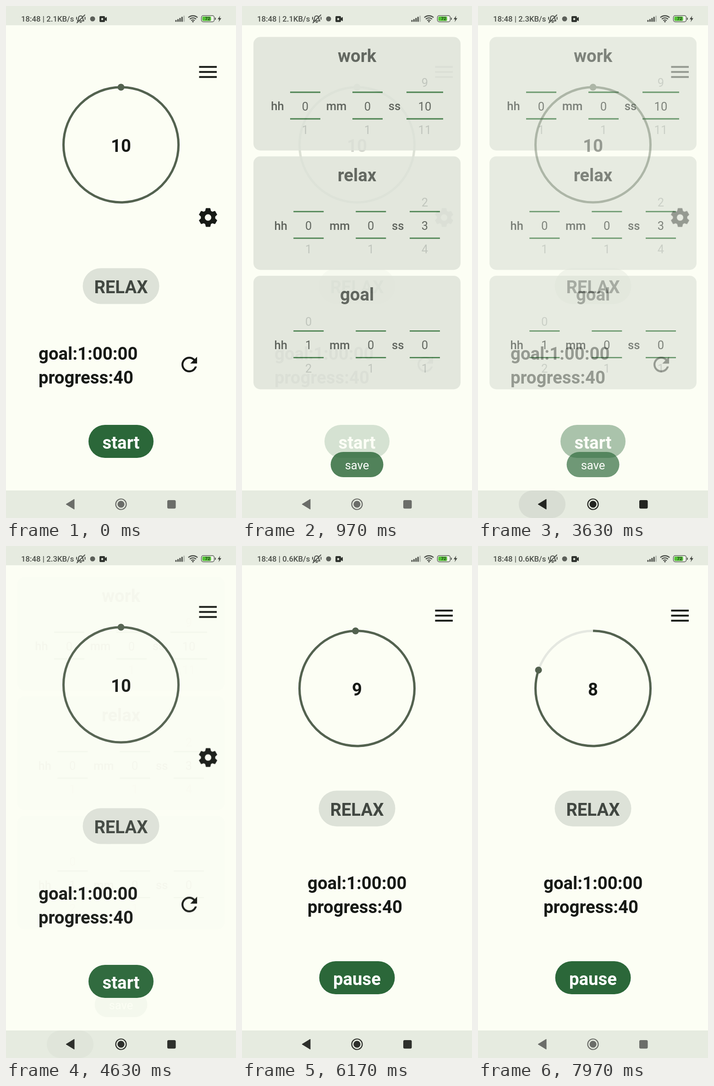
Write an HTML page that moves like this. It is 502 px wide and 1116 px high and loops after 8 s.

```html
<!DOCTYPE html>
<html lang="en">
<head>
<meta charset="utf-8">
<title>Interval timer</title>
<style>
  html, body { margin: 0; width: 100%; height: 100%; overflow: hidden; background: #fcfef4; }
  svg { display: block; width: 100vw; height: 100vh; }
  text { font-family: Roboto, "Noto Sans", sans-serif; font-size: 25.6px; }
  .big { font-size: 38.3px; font-weight: 700; }
  .mid { text-anchor: middle; }
  .ink { fill: #171a16; }
  .soft { fill: #414741; }
  .unit { font-weight: 500; fill: #3d433d; }
  .faint { fill: #b3b9b1; }
  .white { fill: #fff; }
  .green { fill: #2b6739; }
  .panel { fill: #dde2d8; }
  .bar { fill: #e6ebe0; }
  .status { font-size: 16.8px; font-weight: 500; fill: #4b4f49; }
</style>
</head>
<body>
<svg viewBox="0 0 502 1116" preserveAspectRatio="none">
  <rect width="502" height="1116" fill="#fcfef4"/>
  <g id="run"></g>
  <g id="home"></g>
  <g id="settings"></g>

  <rect class="bar" width="502" height="42"/>
  <text class="status" x="33" y="34" id="status"></text>
  <path fill="none" stroke="#4b4f49" stroke-width="2" stroke-linecap="round" stroke-linejoin="round"
    d="M156 32.500h14c-2-2-2.500-4-2.500-6.500a4.600 4.600 0 0 0-9.200 0c0 2.500-.300 4.500-2.300 6.500M161.500 35.500h3M155 36.500l17-17M154 24.500v4.500M172.500 24.500v4.500"/>
  <circle cx="189" cy="28" r="5.500" fill="#5b5f59"/>
  <path fill="#30342f" d="M206 22h8q2 0 2 2v2l4-2v9l-4-2v2q0 2-2 2h-8q-2 0-2-2v-9q0-2 2-2z"/>
  <circle cx="210" cy="28.500" r="2.200" class="bar"/>
  <g id="signal"></g>
  <path fill="none" stroke="#4b4f49" stroke-width="2.400"
    d="M398 25.200a14.500 14.500 0 0 1 20 0M401.200 28.600a9.800 9.800 0 0 1 13.600 0M404.300 31.800a5.400 5.400 0 0 1 7.400 0"/>
  <circle cx="408" cy="34" r="1.800" fill="#4b4f49"/>
  <rect x="426.500" y="21" width="28" height="13.500" rx="4" fill="#f0f4ea" stroke="#5b5f59" stroke-width="1.500"/>
  <rect x="428.500" y="23" width="19" height="9.500" rx="2" fill="#52c234"/>
  <path d="M457 25.500v4.500" stroke="#5b5f59" stroke-width="2"/>
  <text class="mid" x="440" y="31.300" style="font-size:9.500px;font-weight:700" fill="#2b3b27">72</text>
  <path fill="#3f433d" d="M467.500 21l-5.500 8h3.500l-1.500 6 6-8.500h-3.800z"/>

  <rect class="bar" y="1056" width="502" height="60"/>
  <rect id="press" x="89" y="1056" width="102" height="60" rx="30" fill="#d8ddd3"/>
  <g id="nav">
    <path d="M131 1086l18-11v22z"/>
    <circle cx="251" cy="1086" r="11.500" fill="none" stroke-width="2.200"/>
    <circle cx="251" cy="1086" r="7.600" stroke="none"/>
    <rect x="352" y="1077" width="18.500" height="18.500" rx="3" stroke="none"/>
  </g>
</svg>
<script>
const LOOP = 8000, R = 125.5;
const $ = id => document.getElementById(id);

const text = (x, y, cls, s) => `<text x="${x}" y="${y}" class="${cls}">${s}</text>`;
const box = (x, y, w, h, r, cls) =>
  `<rect x="${x}" y="${y}" width="${w}" height="${h}" rx="${r}" class="${cls}"/>`;

function gear(x, y) {
  const tooth = [[-2.75, -6.65], [-2.1, -9.4], [2.1, -9.4], [2.75, -6.65]];
  const pts = [];
  for (let i = 0; i < 6; i++) {
    const c = Math.cos(i * Math.PI / 3), s = Math.sin(i * Math.PI / 3);
    for (const [a, b] of tooth) pts.push((a * c - b * s).toFixed(2) + ' ' + (a * s + b * c).toFixed(2));
  }
  return `<path transform="translate(${x} ${y}) scale(2.13)" fill="#171a16" fill-rule="evenodd"
    stroke="#171a16" stroke-width=".4" stroke-linejoin="round"
    d="M${pts.join('L')}ZM-3.5 0a3.5 3.5 0 1 0 7 0a3.5 3.5 0 1 0-7 0z"/>`;
}

const refresh = `<path class="ink" transform="translate(400 781.5) scale(2.13) translate(-12 -12)"
  d="M17.65 6.35C16.2 4.9 14.21 4 12 4c-4.42 0-7.99 3.58-7.99 8s3.57 8 7.99 8c3.73 0 6.84-2.55 7.73-6h-2.08c-.82 2.33-3.04 4-5.65 4-3.31 0-6-2.69-6-6s2.69-6 6-6c1.66 0 3.14.69 4.22 1.78L13 11h7V4z"/>`;

// Everything the idle and running screens share
function timer({ id, dy, relaxY, goalX, goalY, btnX, btnY, btnW, label }) {
  const cy = 302.5 + dy;
  return `<path d="M421.500 ${132.8 + dy}h38.500m-38.500 11h38.500m-38.500 11h38.500" stroke="#171a16" stroke-width="4"/>
    <g transform="translate(251 ${cy})" fill="none" stroke-width="5">
      <circle r="${R}" stroke="#e5e8e1"/>
      <circle id="${id}Arc" r="${R}" stroke="#53624f" pathLength="1" transform="rotate(-90)"/>
      <circle id="${id}Dot" cy="${-R}" r="7.500" fill="#53624f" stroke="none"/>
    </g>
    <text id="${id}Num" class="big mid ink" x="251" y="${cy + 15.5}">10</text>` +
    box(167.5, relaxY, 167, 78, 39, 'panel') +
    text(251, relaxY + 54.5, 'big mid soft', 'RELAX') +
    text(goalX, goalY, 'big ink', 'goal:1:00:00') +
    text(goalX, goalY + 52, 'big ink', 'progress:40') +
    box(btnX, btnY, btnW, 72, 36, 'green') +
    text(251, btnY + 52, 'big mid white', label);
}

function wheel(x, w, y, value) {
  const line = ly => `<path d="M${x - w / 2} ${ly}h${w}" stroke="#27682f" stroke-width="2.800"/>`;
  return line(y - 30.8) + line(y + 27.2) +
    text(x, y + 9, 'mid soft', value) +
    text(x, y + 60, 'mid faint', value + 1) +
    (value > 0 ? text(x, y - 42.5, 'mid faint', value - 1) : '');
}

function card(i, title, values) {
  const top = 67.5 + i * 260.2, y = top + 151.3;
  const shift = i ? 7.3 : 0;
  let out = box(25, top, 452, 247.5, 15, 'panel') + text(251, top + 54.5, 'big mid soft', title);
  ['hh', 'mm', 'ss'].forEach((unit, k) => {
    const x = k < 2 ? 138 + k * 136 + shift : 399;
    out += text([77.5, 206, 333][k] + shift, y + 8.5, 'unit mid', unit);
    out += wheel(x, values[k] > 9 ? 80 : 66, y, values[k]);
  });
  return out;
}

$('home').innerHTML = timer({ id: 'home', dy: 0, relaxY: 571.5, goalX: 71, goalY: 770.5,
  btnX: 180, btnY: 913, btnW: 142, label: 'start' }) + gear(441, 461) + refresh;
$('run').innerHTML = timer({ id: 'run', dy: 8, relaxY: 533.2, goalX: 143, goalY: 747.5,
  btnX: 168.5, btnY: 905, btnW: 165, label: 'pause' });
$('settings').innerHTML = card(0, 'work', [0, 0, 10]) + card(1, 'relax', [0, 0, 3]) +
  card(2, 'goal', [1, 0, 0]) + box(193.5, 972, 115, 55, 27.5, 'green') + text(251, 1009.5, 'mid white', 'save');
$('signal').innerHTML = [4, 6, 8.5, 11, 13.5].map((h, i) =>
  `<rect x="${369.5 + i * 4.4}" y="${34.5 - h}" width="3" height="${h}" rx="1" fill="${i < 4 ? '#4b4f49' : '#b9beb5'}"/>`).join('');

const clamp = v => Math.min(1, Math.max(0, v));

// cubic-bezier(.4, 0, .2, 1)
function ease(x) {
  x = clamp(x);
  let lo = 0, hi = 1;
  for (let i = 0; i < 24; i++) {
    const m = (lo + hi) / 2, n = 1 - m;
    if (1.2 * m * n * n + .6 * m * m * n + m * m * m < x) lo = m; else hi = m;
  }
  return 3 * lo * lo * (1 - lo) + lo * lo * lo;
}

// Critically damped spring, stiffness 50
function spring(ms) {
  if (ms <= 0) return 0;
  const w = Math.sqrt(50) * ms / 1000;
  return 1 - (1 + w) * Math.exp(-w);
}

function fades(t) {
  if (t < 670) return [1, 0];
  if (t < 3630) { const p = ease((t - 595) / 700); return [1 - p, p]; }
  if (t < 4500) return [.39, .67];
  const p = ease((t - 4085) / 700);
  return [p, 1 - p];
}

function show(id, alpha) {
  $(id).style.display = alpha > .001 ? '' : 'none';
  $(id).style.opacity = alpha;
}

// The screen being entered is drawn above the one being left
function stack(under, over) {
  if (under.nextElementSibling !== over) under.after(over);
}

function draw(t) {
  const running = t >= 5130;
  const [home, settings] = fades(t);
  show('home', running ? 0 : home);
  show('settings', running ? 0 : settings);
  show('run', running ? 1 : 0);
  if (t < 3630) stack($('home'), $('settings'));
  else stack($('settings'), $('home'));

  const left = 1 - .1 * (spring(t - 6125) + spring(t - 7115));
  $('runArc').setAttribute('stroke-dasharray', left > .9999 ? 'none' : `${left} 1`);
  $('runDot').setAttribute('transform', `rotate(${360 * left})`);
  $('runNum').textContent = t < 6125 ? 10 : t < 7115 ? 9 : 8;

  const speed = t < 1970 ? '2.1' : t < 5600 ? '2.3' : '0.6';
  $('status').textContent = `18:48 | ${speed}KB/s`;

  show('press', t < 3630 ? 0 : t < 4500 ? 1 : .8 * clamp(1 - (t - 4500) / 300));
  const dark = t < 3630 ? 0 : t < 4500 ? 1 : .85 * (1 - clamp((t - 7000) / 300));
  const g = Math.round(107 - 72 * dark);
  const ink = `rgb(${g},${g + 2},${g - 2})`;
  $('nav').setAttribute('fill', ink);
  $('nav').setAttribute('stroke', ink);
}

function tick() {
  draw(performance.now() % LOOP);
  requestAnimationFrame(tick);
}
tick();
</script>
</body>
</html>
```
